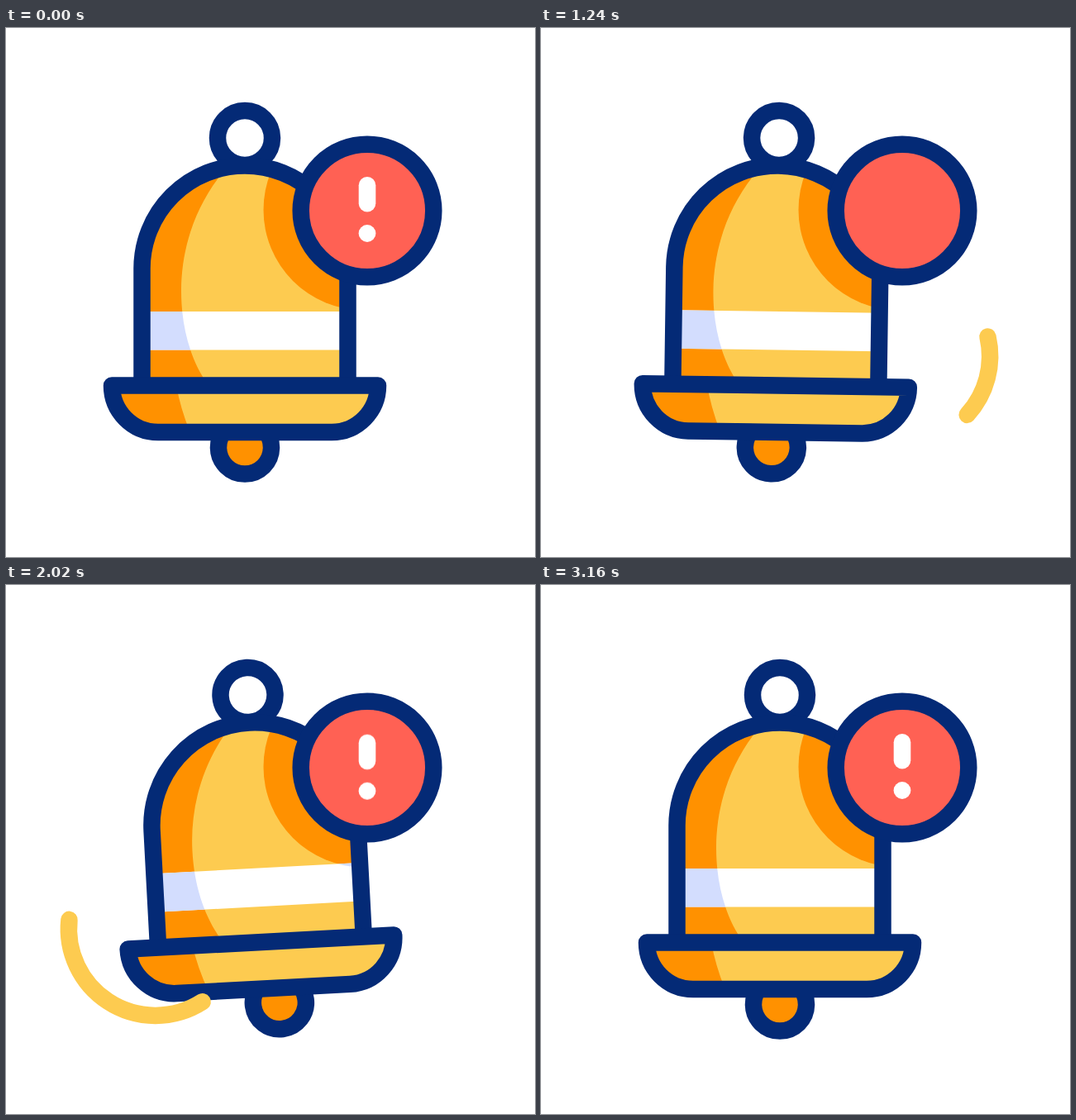
An HTML page for the animation above (3200 ms loop, 640 by 640 pixels).

```html
<!DOCTYPE html>
<html lang="en">
<head>
<meta charset="utf-8">
<title>Ringing bell</title>
<style>
  @property --tilt { syntax: "<angle>"; inherits: true; initial-value: 0deg; }
  @property --clap { syntax: "<angle>"; inherits: true; initial-value: 0deg; }
  @property --head { syntax: "<number>"; inherits: false; initial-value: 0; }
  @property --tail { syntax: "<number>"; inherits: false; initial-value: 0; }

  :root {
    --navy: #042a76;
    --orange: #ff9100;
    --yellow: #fdcb50;
    --pale: #d3ddfe;
    --red: #ff6154;
    --loop: 3200ms;
  }
  html, body { margin: 0; width: 100%; height: 100%; overflow: hidden; background: #fff; }
  svg { display: block; width: 100%; height: 100%; animation: swing var(--loop) infinite; }

  .line { stroke: var(--navy); stroke-width: 20.5; stroke-linejoin: round; }
  .bell { transform-origin: 290px 67px; transform: rotate(var(--tilt)); }
  .still { transform-origin: 290px 67px; transform: rotate(calc(-1 * var(--tilt))); }
  .clapper { transform-origin: 289px 267px; transform: rotate(var(--clap)); }
  .white { fill: #fff; }
  .yellow { fill: var(--yellow); }
  .orange { fill: var(--orange); }
  .pale { fill: var(--pale); }
  .red { fill: var(--red); }
  .none { fill: none; }

  .mark { animation: drop var(--loop) infinite; }

  .trail {
    fill: none;
    stroke: var(--yellow);
    stroke-width: 20.5;
    stroke-linecap: round;
    stroke-dasharray: calc((var(--head) - var(--tail)) * 1px) 999px;
    stroke-dashoffset: calc(var(--tail) * -1px);
    animation: head var(--loop) infinite, tail var(--loop) infinite, show var(--loop) infinite;
    animation-delay: calc(var(--at) - var(--loop));
  }

  @keyframes swing {
    0%, 5% { --tilt: 0deg; --clap: 0deg; animation-timing-function: cubic-bezier(.17, 0, .2, 1); }
    28.4375% { --tilt: -10deg; --clap: -25deg; animation-timing-function: cubic-bezier(.6, 0, .21, 1); }
    51.875% { --tilt: 10deg; --clap: 23deg; animation-timing-function: cubic-bezier(.6, 0, .21, 1); }
    75.3125% { --tilt: -10deg; --clap: -19deg; animation-timing-function: cubic-bezier(.58, 0, .82, 1); }
    98.75%, 100% { --tilt: 0deg; --clap: 0deg; }
  }
  @keyframes drop {
    0%, 21.25%, 60% { transform: translateY(0); animation-timing-function: cubic-bezier(.32, 0, .67, 0); }
    40.625%, 79.375% { transform: translateY(160px); animation-timing-function: cubic-bezier(.33, .67, .67, 1); }
    98.75%, 100% { transform: translateY(0); }
  }
  @keyframes head {
    0% { --head: 0; animation-timing-function: ease-in-out; }
    10%, 100% { --head: 100; }
  }
  @keyframes tail {
    0%, 7.5% { --tail: 0; animation-timing-function: ease-in-out; }
    18.75%, 100% { --tail: 100; }
  }
  @keyframes show {
    0% { opacity: 1; animation-timing-function: step-end; }
    18.75%, 100% { opacity: 0; }
  }
</style>
</head>
<body>
<svg viewBox="0 0 640 640">
  <defs>
    <clipPath id="body"><path d="M164.5 432V291A124.5 124.5 0 0 1 413.5 291V432Z"/></clipPath>
    <clipPath id="band"><path d="M160 343H418V389.5H160Z"/></clipPath>
    <clipPath id="rim"><path d="M128 432.5H450A56 56.5 0 0 1 394 489H184A56 56.5 0 0 1 128 432.5Z"/></clipPath>
    <clipPath id="disc"><circle cx="437" cy="221" r="70.5"/></clipPath>
  </defs>

  <g class="bell">
    <circle class="line white" cx="289" cy="133" r="33"/>
    <circle class="line orange clapper" cx="289" cy="507.5" r="32"/>

    <g clip-path="url(#body)">
      <path class="yellow" d="M150 150H430V440H150Z"/>
      <path class="orange" d="M150 150H276L258 180C228 219 212 268 212 318C212 360 222 395 238 422L246 436H150Z"/>
      <circle class="orange still" cx="433" cy="220" r="121.5"/>
      <g clip-path="url(#band)">
        <path class="white" d="M150 340H430V392H150Z"/>
        <path class="pale" d="M150 318H212C212 360 222 395 238 422H150Z"/>
        <circle class="pale still" cx="433" cy="220" r="121.5"/>
      </g>
    </g>
    <path class="line none" d="M164.5 432V291A124.5 124.5 0 0 1 413.5 291V432"/>

    <g clip-path="url(#rim)">
      <path class="yellow" d="M120 425H460V495H120Z"/>
      <path class="orange" d="M120 425H205Q209 455 223 490H120Z"/>
    </g>
    <path class="line none" d="M128 432.5H450A56 56.5 0 0 1 394 489H184A56 56.5 0 0 1 128 432.5Z"/>
  </g>

  <path class="trail" style="--at: 240ms" pathLength="100" d="M77 344A105 105 0 0 0 239 451"/>
  <path class="trail" style="--at: 1100ms" pathLength="100" d="M540.5 373.5A105 105 0 0 1 376.5 482"/>
  <path class="trail" style="--at: 1730ms" pathLength="100" d="M78 395A105 105 0 0 0 241 502"/>
  <path class="trail" style="--at: 2475ms" pathLength="100" d="M542 425A105 105 0 0 1 378 533"/>

  <circle class="line red" cx="437" cy="221" r="80.3"/>
  <g clip-path="url(#disc)">
    <g class="mark white">
      <rect x="426.7" y="180" width="20.6" height="42.5" rx="10.3"/>
      <circle cx="437" cy="248.5" r="10.4"/>
    </g>
  </g>
</svg>
</body>
</html>
```
